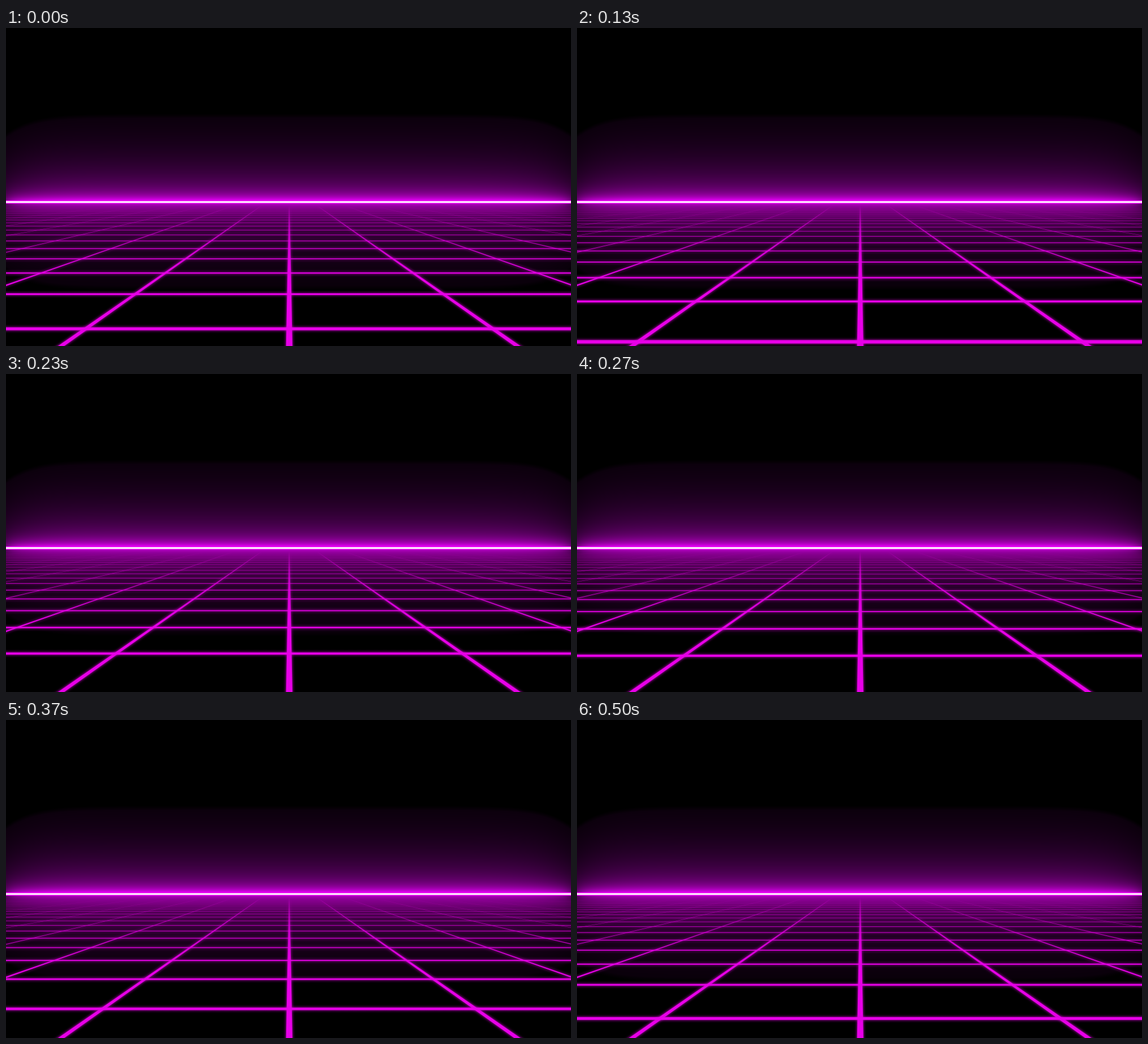
An HTML page with a canvas for the animation above (0.53 s loop, 998x561 px).

```html
<!DOCTYPE html>
<html lang="en">
<head>
<meta charset="utf-8">
<title>Neon grid</title>
<style>
  html, body { margin: 0; width: 100%; height: 100%; overflow: hidden; background: #000; }
  canvas { display: block; }
</style>
</head>
<body>
<canvas id="stage" width="998" height="561"></canvas>
<script>
const W = 998, H = 561, LOOP = 530;
const HORIZON = 307;                 // bright line
const VANISH = { x: 500.3, y: 279 }; // vanishing point of the floor
const DEPTH = 784, FIRST_ROW = 3.115, COLUMN = 1.429;

const ctx = document.getElementById('stage').getContext('2d');
const sigmoid = v => 1 / (1 + Math.exp(-v));

// Sum of a wide and a narrow halo; each one fades out towards the side edges.
function makeGlow() {
  const layer = document.createElement('canvas');
  layer.width = W;
  layer.height = H;
  const g = layer.getContext('2d');
  const image = g.createImageData(W, H);
  for (let y = 0, i = 0; y < H; y++) {
    const dy = Math.abs(y + 0.5 - HORIZON);
    const wide = 130 * Math.exp(-dy / 62);
    const narrow = 140 * Math.exp(-dy / 10);
    for (let x = 0; x < W; x++, i += 4) {
      const side = Math.min(x, W - 1 - x);
      let v = wide * sigmoid(side / 38 + 0.3) + narrow * sigmoid(side / 8);
      v *= Math.min(1, Math.max(0, (v - 10.5) / 1.5));
      if (y > HORIZON) v *= 0.8;
      image.data[i] = Math.min(232, v);
      image.data[i + 2] = Math.min(238, v * 1.08);
      image.data[i + 3] = 255;
    }
  }
  g.putImageData(image, 0, 0);
  return layer;
}

const glow = makeGlow();
const neon = ctx.createLinearGradient(0, 313, 0, 440);
[[0, 0], [0.08, 0.3], [0.25, 0.55], [0.55, 0.8], [1, 1]].forEach(([at, alpha]) =>
  neon.addColorStop(at, `rgba(232,0,232,${alpha})`));

function drawColumn(n) {
  const near = 300, far = 34, half = 0.0195;
  const point = (d, side) =>
    ctx.lineTo(VANISH.x + (n * COLUMN + side * half) * d, VANISH.y + d);
  ctx.beginPath();
  point(far, -1);
  point(far, 1);
  point(near, 1);
  point(near, -1);
  ctx.fill();
}

function drawRow(k) {
  const d = DEPTH / k;
  const thickness = 0.6 + d * d / 14500;
  ctx.fillRect(-20, VANISH.y + d - thickness / 2, W + 40, thickness);
}

// Thirty steps a second, slowing slightly before the loop closes.
function travel(ms) {
  const step = Math.floor((3 * Math.floor(ms / 10) + 1) / 10);
  return step <= 13 ? step * 0.065 : 0.845 + (step - 13) * 0.155 / 3;
}

function draw(ms) {
  ctx.drawImage(glow, 0, 0);
  ctx.save();
  ctx.fillStyle = neon;
  ctx.shadowColor = '#d800d8';
  ctx.shadowBlur = 5;
  for (let n = -14; n <= 14; n++) drawColumn(n);
  const first = FIRST_ROW - travel(ms);
  for (let j = 0; j < 21; j++) drawRow(first + j);
  ctx.restore();
  ctx.fillStyle = '#e800f0';
  ctx.fillRect(0, 304, W, 6);
  ctx.fillStyle = '#fff';
  ctx.fillRect(0, 305.5, W, 3);
}

function frame() {
  draw(performance.now() % LOOP);
  requestAnimationFrame(frame);
}
frame();
</script>
</body>
</html>
```
